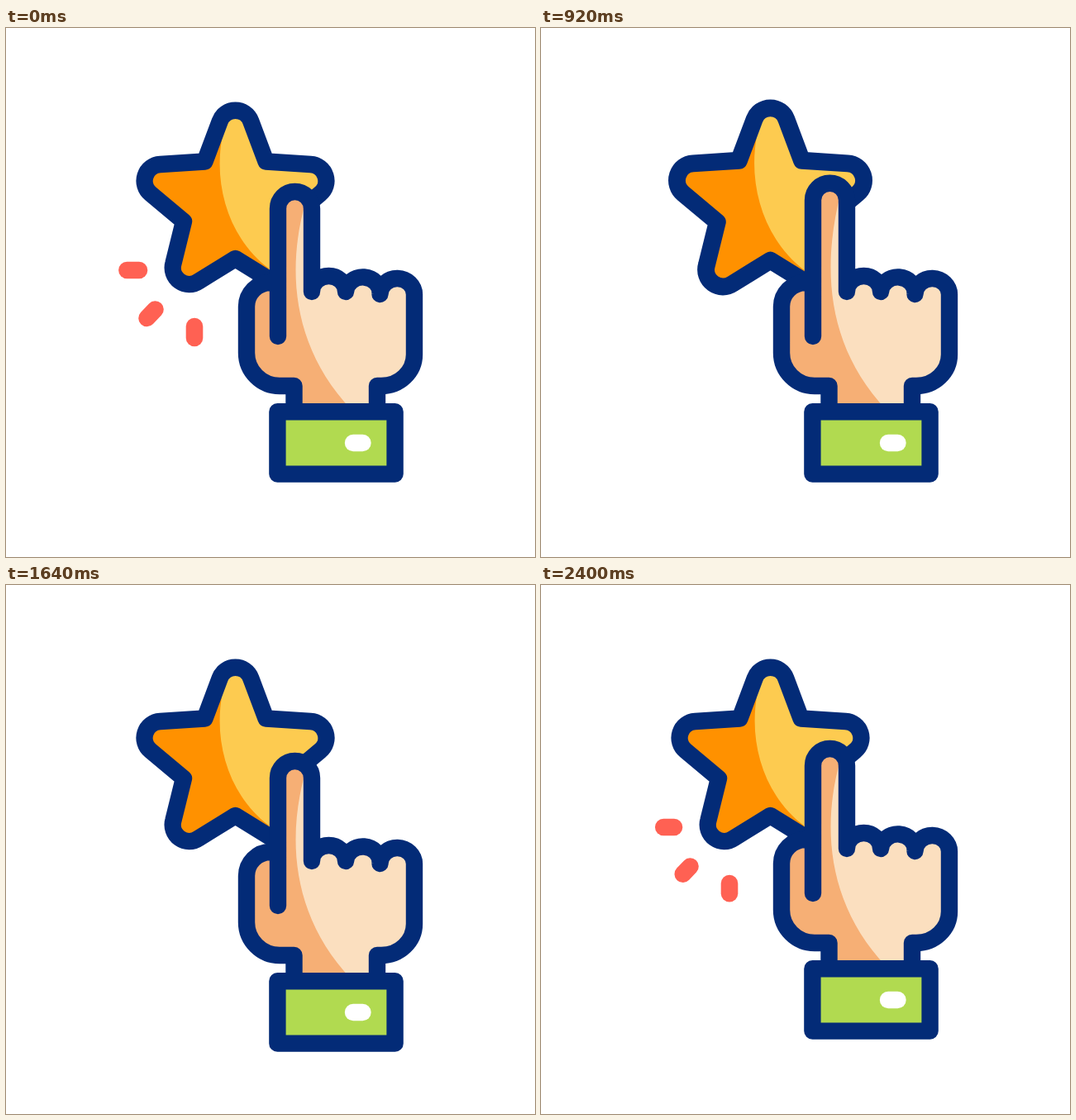
Recreate the animation shown at these times as an HTML page. Size 640 by 640 pixels, loop 2440 ms.

```html
<!DOCTYPE html>
<html lang="en">
<head>
<meta charset="utf-8">
<title>Tap the star</title>
<style>
  html, body { margin: 0; width: 100%; height: 100%; overflow: hidden; background: #fff; }
  svg { display: block; width: 100%; height: 100%; }
  .ink { fill: none; stroke: #032b77; stroke-width: 20.4; stroke-linecap: round; stroke-linejoin: round; }
  .spark { stroke: #ff6153; stroke-width: 20.6; stroke-linecap: round; }
</style>
</head>
<body>
<svg viewBox="0 0 640 640">
  <defs>
    <path id="starPath" d="M240.5 161.5L258.7 113A20 20 0 0 1 296.3 113L314.5 161.5L368.5 165A20 20 0 0 1 380 200.5L340 234L352.5 284.5A20 20 0 0 1 322 306.5L277.5 279L233 306.5A20 20 0 0 1 202.5 284.5L215 234L175 200.5A20 20 0 0 1 186.5 165Z"/>
    <clipPath id="starClip"><use href="#starPath"/></clipPath>
    <clipPath id="handClip"><path id="handShape"/></clipPath>
  </defs>
  <g id="sparks"></g>
  <g id="star">
    <use href="#starPath" fill="#fdcb50"/>
    <path clip-path="url(#starClip)" fill="#ff9100" d="M262 130C250 190 270 255 318 291V330H140V100Z"/>
    <use href="#starPath" class="ink"/>
  </g>
  <g id="hand">
    <path id="skin" fill="#fbdfbf"/>
    <path id="shade" clip-path="url(#handClip)" fill="#f6af75"/>
    <path id="outline" class="ink"/>
    <path class="ink" style="fill:#b1da50" d="M328.4 464.2H470.6V539.6H328.4Z"/>
    <path d="M420 502H431.5" stroke="#fff" stroke-width="20.4" stroke-linecap="round"/>
  </g>
</svg>
<script>
const LOOP = 2440, STEP = 40;
const TAP_START = 50, TAP_GAP = 1010;
const $ = id => document.getElementById(id);
const clamp = v => Math.min(1, Math.max(0, v));
const mix = (a, b, k) => a + (b - a) * k;
const hump = u => u > 0 && u < 1 ? Math.sin(Math.PI * u) : 0;

// Each ray: inner point, outer point
const rays = [
  [161, 293, 146.4, 293],
  [180.5, 340.5, 170.5, 351],
  [228, 361, 228, 375]
];
const opposite = r => r.map((v, i) => (i % 2 ? 488 : 596) - v);

function addBurst(list, peaks) {
  const lines = list.map(() => {
    const el = document.createElementNS("http://www.w3.org/2000/svg", "line");
    el.setAttribute("class", "spark");
    $("sparks").append(el);
    return el;
  });
  return { list, peaks, lines };
}

const bursts = [
  addBurst(rays, [0, 1240]),
  addBurst(rays.map(opposite), [1300])
];

// Signed time from a peak, wrapped around the loop
const since = (t, peak) => (t - peak + LOOP * 1.5) % LOOP - LOOP / 2;

function drawBurst({ list, peaks, lines }, t) {
  const d = peaks.map(p => since(t, p)).find(v => v > -320 && v < 340);
  const on = d !== undefined;
  const head = clamp(1 + d / 320);
  const tail = 1 - (1 - clamp(d / 340)) ** 3;
  lines.forEach((el, i) => {
    el.style.display = on ? "" : "none";
    if (!on) return;
    const [x0, y0, x1, y1] = list[i];
    el.setAttribute("x1", mix(x0, x1, tail));
    el.setAttribute("y1", mix(y0, y1, tail));
    el.setAttribute("x2", mix(x0, x1, head));
    el.setAttribute("y2", mix(y0, y1, head));
  });
}

function drawStar(t) {
  const k = 1 + 0.063 * hump(t % (LOOP / 3) / 460) ** 2;
  $("star").setAttribute("transform", `translate(277.5 205) scale(${k}) translate(-277.5 -205)`);
}

function drawHand(t) {
  let drop = 0, reach = 0;
  for (let i = 0; i < 2; i++) {
    const s = t - TAP_START - i * TAP_GAP;
    drop += 26 * hump(s / 800) ** 2;
    reach += 11 * hump((s - 790) / 210);
  }
  const top = 218.5 - reach;
  const finger = `V${top}A20.5 20.5 0 0 1 370 ${top}V319`;
  const right = "A20.5 19 0 0 1 411 319A20.7 19 0 0 1 452.5 322A20.7 19.5 0 0 1 494 323V395A40 38 0 0 1 454 433H449V464";
  const left = "M348.5 464V433H331A40 40 0 0 1 291 393V337A29 29 0 0 1 320 308H329";
  const shape = left + finger + right + "Z";
  $("skin").setAttribute("d", shape);
  $("handShape").setAttribute("d", shape);
  $("shade").setAttribute("d", `M362 ${212 - reach}C340 290 345 385 418 462V475H270V150H362Z`);
  $("outline").setAttribute("d", left + "M329 373" + finger + right);
  $("hand").setAttribute("transform", `translate(0 ${drop})`);
}

function draw(ms) {
  const t = Math.floor(ms % LOOP / STEP) * STEP;
  bursts.forEach(b => drawBurst(b, t));
  drawStar(t);
  drawHand(t);
}

const begin = performance.now();
function tick() {
  draw(performance.now() - begin);
  requestAnimationFrame(tick);
}
tick();
</script>
</body>
</html>
```
